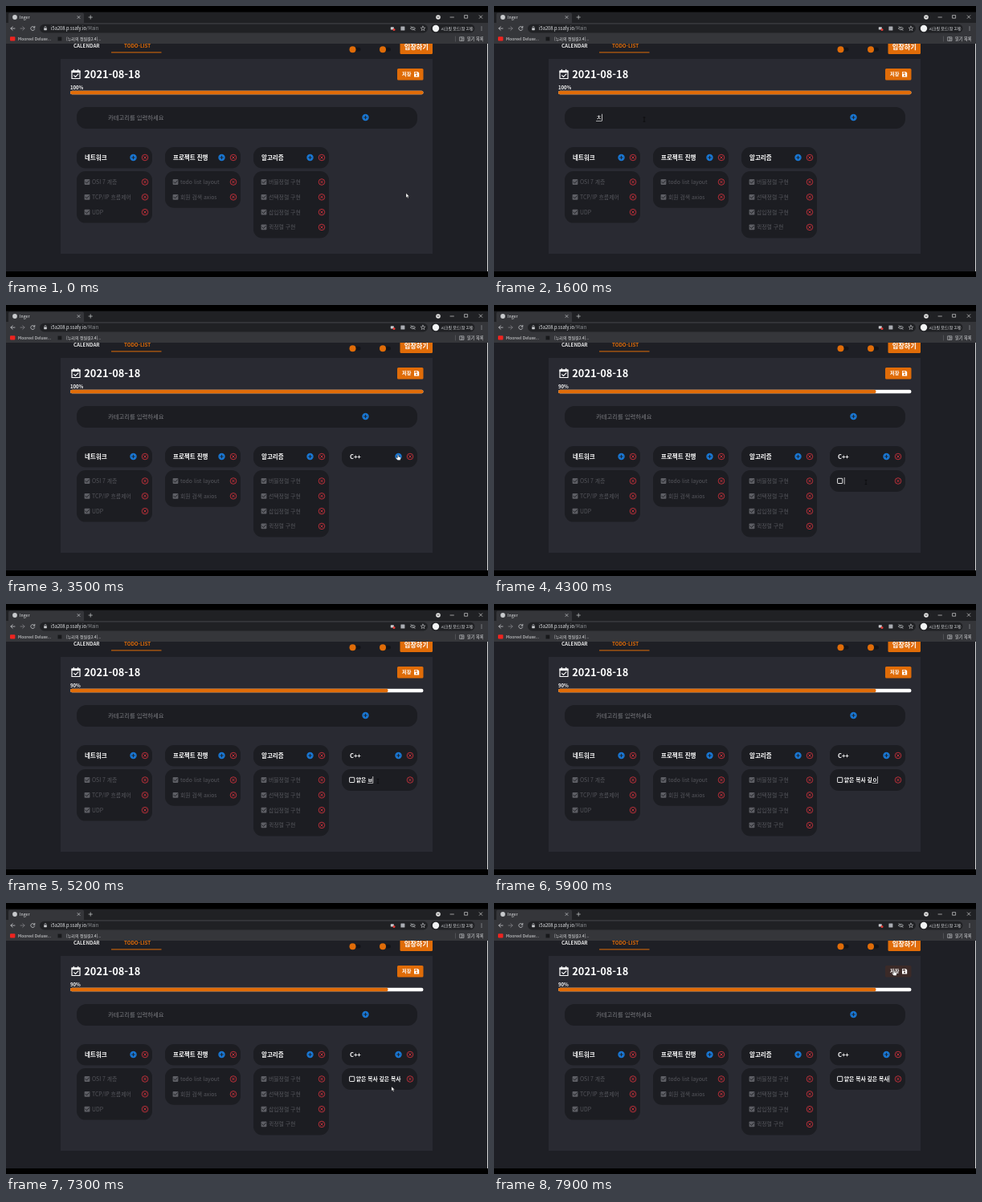
Animation of 600x338 px, one loop 8000 ms. Source, as an HTML page:

```html
<!DOCTYPE html>
<html lang="ko">
<head>
<meta charset="utf-8">
<title>Todo list</title>
<style>
  html, body { margin: 0; width: 100%; height: 100%; overflow: hidden; background: #000; }
  svg { display: block; width: 100vw; height: 100vh; }
  text { font-family: "Noto Sans CJK KR", "Noto Sans CJK", "Noto Sans", sans-serif; white-space: pre; }
</style>
</head>
<body>
<svg id="stage" viewBox="0 0 600 338"></svg>
<script>
const LOOP = 8000;
const C = {
  strip: '#202124', bar: '#35363a', page: '#1e1f25', panel: '#292a32', card: '#1c1d22',
  orange: '#e06c08', blue: '#1976d2', red: '#c9323c', dim: '#56575d', white: '#fff', icon: '#c8cacd'
};
const stage = document.getElementById('stage');

function add(parent, tag, attrs, content) {
  const el = document.createElementNS('http://www.w3.org/2000/svg', tag);
  for (const key in attrs) el.setAttribute(key, attrs[key]);
  if (content !== undefined) el.textContent = content;
  parent.appendChild(el);
  return el;
}
const rect = (p, x, y, width, height, fill, rx = 0) => add(p, 'rect', { x, y, width, height, fill, rx });
const circle = (p, cx, cy, r, fill) => add(p, 'circle', { cx, cy, r, fill });
const line = (p, d, stroke, w = 0.8) =>
  add(p, 'path', { d, stroke, fill: 'none', 'stroke-width': w, 'stroke-linecap': 'round', 'stroke-linejoin': 'round' });
// y is the vertical middle of the text
const label = (p, x, y, size, fill, content, weight = 400, anchor = 'start') =>
  add(p, 'text', { x, y: y + size * 0.36, 'font-size': size, fill, 'font-weight': weight, 'text-anchor': anchor }, content);
const show = (el, on) => el.setAttribute('visibility', on ? 'visible' : 'hidden');

function plus(p, x, y) {
  circle(p, x, y, 4.2, C.blue);
  line(p, `M${x - 1.8} ${y}h3.6M${x} ${y - 1.8}v3.6`, C.card, 0.9);
}
function remove(p, x, y) {
  add(p, 'circle', { cx: x, cy: y, r: 3.8, fill: 'none', stroke: C.red, 'stroke-width': 0.9 });
  line(p, `M${x - 1.4} ${y - 1.4}l2.8 2.8m0 -2.8l-2.8 2.8`, C.red, 0.9);
}
function header(p, x, title) {
  rect(p, x, 176, 94, 26.5, C.card, 11);
  label(p, x + 10, 189, 7.5, C.white, title, 700);
  plus(p, x + 70.5, 189);
  remove(p, x + 85, 189);
}
const listBox = (p, x, count) => rect(p, x, 206, 94, 27 + 18.8 * (count - 1), C.card, 11);
function column(x, title, items) {
  header(stage, x, title);
  listBox(stage, x, items.length);
  items.forEach((item, i) => {
    const y = 219.5 + 18.8 * i;
    rect(stage, x + 9.6, y - 3.4, 6.8, 6.8, '#5d5e64', 0.8);
    line(stage, `M${x + 11} ${y}l1.5 1.6l2.9 -3.2`, C.card, 0.9);
    label(stage, x + 19, y, 6.85, C.dim, item);
    remove(stage, x + 85, y);
  });
}

function drawPage() {
  rect(stage, 0, 47, 600, 284, C.page);
  label(stage, 84, 49.3, 6.2, '#e8e8e8', 'CALENDAR', 700);
  label(stage, 147, 49.3, 6.2, C.orange, 'TODO-LIST', 700);
  rect(stage, 131, 57.4, 62.5, 1, C.orange);
  for (const x of [431.5, 469]) {
    rect(stage, x - 1, 51.8, 11, 4.8, '#141519', 2.4);
    circle(stage, x, 54.3, 4, C.orange);
  }
  rect(stage, 490.5, 40, 40.5, 20, C.orange, 1.5);
  label(stage, 510.7, 51, 8.2, C.white, '입장하기', 700, 'middle');

  rect(stage, 68, 66, 463, 243, C.panel);
  line(stage, 'M82 81h10v9.5h-10zM84.3 79.3v1.5M89.7 79.3v1.5', C.white, 1.2);
  rect(stage, 81.6, 80.5, 10.8, 2.6, C.white);
  line(stage, 'M84.6 86.6l1.8 1.8l3.5 -3.6', C.white, 1.1);
  label(stage, 97.3, 85.5, 12.8, C.white, '2021-08-18', 700);
  rect(stage, 80, 105.8, 439.5, 4.4, C.white, 2.2);
  rect(stage, 88, 126, 424, 27, C.card, 12);
  plus(stage, 447.5, 139);
  column(88, '네트워크', ['OSI 7 계층', 'TCP/IP 흐름제어', 'UDP']);
  column(198, '프로젝트 진행', ['todo list layout', '회원 검색 axios']);
  column(308, '알고리즘', ['버블정렬 구현', '선택정렬 구현', '삽입정렬 구현', '퀵정렬 구현']);
  rect(stage, 599, 47, 1, 284, '#d6d6d8');
}

function drawBrowser() {
  rect(stage, 0, 0, 600, 7.6, '#000');
  rect(stage, 0, 7.6, 600, 14, C.strip);
  rect(stage, 3, 8.6, 94, 14, C.bar, 2);
  rect(stage, 0, 21, 600, 26, C.bar);
  circle(stage, 11, 14, 2.9, C.icon);
  label(stage, 17, 14, 5.2, '#e3e4e6', 'Inger');
  line(stage, 'M89 12.5l3 3m0 -3l-3 3M103 14h4.4M105.2 11.8v4.4', C.icon, 0.7);
  circle(stage, 538, 14, 2.8, '#e8e8e8');
  line(stage, 'M537 13.4l1 1.2l1 -1.2', '#111', 0.8);
  line(stage, 'M553 14h4.4M571 11.6h3.6v3.6h-3.6zM589.2 11.8l3.6 3.6m0 -3.6l-3.6 3.6', '#eee', 0.6);

  line(stage, 'M11 28h-5m2.2 -2.3l-2.3 2.3l2.3 2.3', C.icon);
  line(stage, 'M18 28h5m-2.2 -2.3l2.3 2.3l-2.3 2.3', '#808286');
  line(stage, 'M35.4 26.6a2.5 2.5 0 1 0 .3 2.2M35.8 25.3v1.8h-1.8', C.icon);
  rect(stage, 42, 22.8, 483, 10.6, C.strip, 5.3);
  rect(stage, 47.2, 27.4, 3.6, 2.8, C.icon, 0.4);
  line(stage, 'M48 27.4v-1a1 1 0 0 1 2 0v1', C.icon, 0.6);
  const url = label(stage, 56, 28, 5.7, '#e8eaed', 'i5a208.p.ssafy.io');
  add(url, 'tspan', { fill: '#8f9296' }, '/Main');
  rect(stage, 478.8, 26.2, 4, 3.2, C.icon, 0.5);
  circle(stage, 483, 29.4, 1.5, '#e33b35');
  rect(stage, 491.4, 25.5, 5, 5, '#a9acb2', 0.5);
  line(stage, 'M503.5 28q3 -3.5 6 0q-3 3.5 -6 0M504 25.5l5 5', C.icon, 0.7);
  line(stage, 'M519 25.2l.8 1.9l2 .1l-1.5 1.3l.5 2l-1.8 -1.1l-1.8 1.1l.5 -2l-1.5 -1.3l2 -.1z', C.icon, 0.6);
  rect(stage, 528.5, 22.8, 55, 10.6, C.strip, 5.3);
  circle(stage, 535, 28, 4.2, '#f1f3f4');
  label(stage, 541.5, 28, 4.9, '#e8eaed', '시크릿 모드(창 2개)');
  for (const y of [26, 28, 30]) circle(stage, 592, y, 0.6, C.icon);

  rect(stage, 5, 38.2, 6.4, 5.4, '#ee2420', 1);
  label(stage, 15, 41, 5.1, '#e3e4e6', 'Mooreel Deluxe...');
  rect(stage, 64.5, 38.6, 4.8, 4.8, '#17181a');
  label(stage, 75, 41, 5, '#e3e4e6', '[누리의 정원길2.4]...');
  rect(stage, 559.5, 37.5, 0.5, 7, '#6c6e72');
  line(stage, 'M565 38.8h5v4.6h-5zM567 38.8v4.6M568 40.4h1.2M568 41.9h1.2', C.icon, 0.6);
  label(stage, 574, 41, 5.2, '#e3e4e6', '읽기 목록');
}

function makeField(p, x, y, size, weight) {
  const text = label(p, x, y, size, C.white, '', weight);
  const underline = rect(p, x, y + 4, 0, 0.6, C.white);
  const caret = rect(p, x, y - 4.3, 0.7, 8.6, C.white);
  return (value, composing, caretOn) => {
    text.textContent = value;
    const width = value ? text.getComputedTextLength() : 0;
    const glyph = composing && value ? text.getSubStringLength(value.length - 1, 1) : 0;
    underline.setAttribute('x', x + width - glyph);
    underline.setAttribute('width', glyph);
    caret.setAttribute('x', x + width);
    show(caret, caretOn);
  };
}

drawPage();
drawBrowser();

const progress = rect(stage, 80, 105.8, 439.5, 4.4, C.orange, 2.2);
const percent = label(stage, 80, 102, 6, C.white, '100%', 700);
const saveBox = rect(stage, 487, 78, 32.5, 14.5, C.orange, 1.5);
label(stage, 493, 85, 6.2, C.white, '저장', 700);
add(stage, 'path', { d: 'M508 82h4.6l1.6 1.6v4.8h-6.2z', fill: C.white });
const saveMarks = add(stage, 'path', { d: 'M508.8 82.8h3.2v1.6h-3.2z', fill: C.orange });
const saveDot = circle(stage, 511.1, 86.4, 1, C.orange);

const placeholder = label(stage, 127, 139, 7.35, '#7b7c81', '카테고리를 입력하세요');
const setInput = makeField(stage, 127, 139, 7.8, 400);
const newHeader = add(stage, 'g', {});
header(newHeader, 418, 'C++');
const newList = add(stage, 'g', {});
listBox(newList, 418, 1);
add(newList, 'rect', { x: 427.6, y: 216.3, width: 6.2, height: 6.2, rx: 0.6, fill: 'none', stroke: C.white, 'stroke-width': 0.9 });
remove(newList, 503, 219.5);
const setItem = makeField(newList, 435.8, 219.3, 6.8, 700);

const pointers = {
  arrow: add(stage, 'path', { d: 'M0 0v5.4l1.3 -1.2l.9 2l.9 -.4l-.9 -1.9h1.7z', fill: C.white, stroke: '#111', 'stroke-width': 0.3 }),
  beam: line(stage, 'M-1 -2.6h2M0 -2.6v5.2M-1 2.6h2', '#08080a', 0.6),
  hand: add(stage, 'path', {
    d: 'M-.6 -1.8q.7 -.9 1.3 0v2l2 .5q.9 .4 .7 1.3l-.6 2.6h-3.2l-2.2 -2.6q-.2 -1 .8 -.7l1.2 .8z',
    fill: C.white, stroke: '#111', 'stroke-width': 0.3
  })
};

const ENTER = 2900, ADD_ITEM = 3850, FOCUS_ITEM = 4180;
const TYPE_START = 4680, KEY = 74;
const path = [
  [0, 498, 233.5], [800, 498, 233.5], [1250, 187, 141.5], [ENTER, 187, 141.5], [3500, 488, 189],
  [ADD_ITEM, 488, 189], [4150, 463, 221], [6850, 463, 221], [7320, 480, 229], [7750, 498, 86]
];
const inputKeys = [[1500, 'ㅊ'], [1800, ''], [2100, 'C'], [2400, 'C+'], [2600, 'C++'], [ENTER, '']];
const words = [['얕은', 'ㅇ 야 얕 얕ㅇ 얕으 얕은'], ['복사', 'ㅂ 보 복 복ㅅ 복사'],
  ['깊은', 'ㄱ 기 깊 깊ㅇ 깊으 깊은'], ['복사', 'ㅂ 보 복 복ㅅ 복사']];
const itemKeys = [];
let typed = '';
words.forEach(([word, strokes], i) => {
  for (const s of strokes.split(' ')) itemKeys.push(typed + s);
  typed += word + ' ';
  if (i < words.length - 1) itemKeys.push(typed);
});

const clamp = v => Math.max(0, Math.min(1, v));
const ease = v => v * v * (3 - 2 * v);
const blink = since => since >= 0 && since % 1060 < 530;

function mouseAt(t) {
  let i = path.length - 1;
  while (path[i][0] > t) i--;
  const a = path[i], b = path[i + 1] || a;
  const k = a === b ? 0 : ease((t - a[0]) / (b[0] - a[0]));
  return [a[1] + (b[1] - a[1]) * k, a[2] + (b[2] - a[2]) * k];
}

function render(t) {
  const last = inputKeys.filter(k => k[0] <= t).pop() || [1300, ''];
  show(placeholder, !last[1]);
  setInput(last[1], last[1] === 'ㅊ', t < ADD_ITEM && blink(t - last[0]));

  show(newHeader, t >= ENTER);
  newList.style.display = t >= ADD_ITEM ? '' : 'none';
  const stroke = Math.min(itemKeys.length - 1, Math.floor((t - TYPE_START) / KEY));
  const value = stroke < 0 ? '' : itemKeys[stroke];
  const typing = stroke >= 0 && stroke < itemKeys.length - 1;
  const lastStroke = TYPE_START + KEY * (itemKeys.length - 1);
  const since = t > lastStroke ? t - lastStroke : t - FOCUS_ITEM;
  setItem(value, typing && !value.endsWith(' '), typing || blink(since));

  const part = 1 - 0.1 * ease(clamp((t - ADD_ITEM) / 300));
  progress.setAttribute('width', 439.5 * part);
  percent.textContent = t < ADD_ITEM ? '100%' : '90%';

  const [x, y] = mouseAt(t);
  const onSave = x > 487 && x < 519.5 && y > 78 && y < 92.5;
  const onPlus = t >= ENTER && Math.hypot(x - 488.5, y - 189) < 5;
  const onInput = x > 127 && x < 435 && y > 133 && y < 146;
  const onItem = t >= ADD_ITEM && x > 435 && x < 492 && y > 214 && y < 225;
  const kind = onSave || onPlus ? 'hand' : onInput || onItem ? 'beam' : 'arrow';
  for (const name in pointers) {
    show(pointers[name], name === kind);
    pointers[name].setAttribute('transform', `translate(${x} ${y})`);
  }
  const saveColor = onSave ? '#3b2a28' : C.orange;
  for (const el of [saveBox, saveMarks, saveDot]) el.setAttribute('fill', saveColor);
}

const start = performance.now();
function tick() {
  render((performance.now() - start) % LOOP);
  requestAnimationFrame(tick);
}
tick();
</script>
</body>
</html>
```
